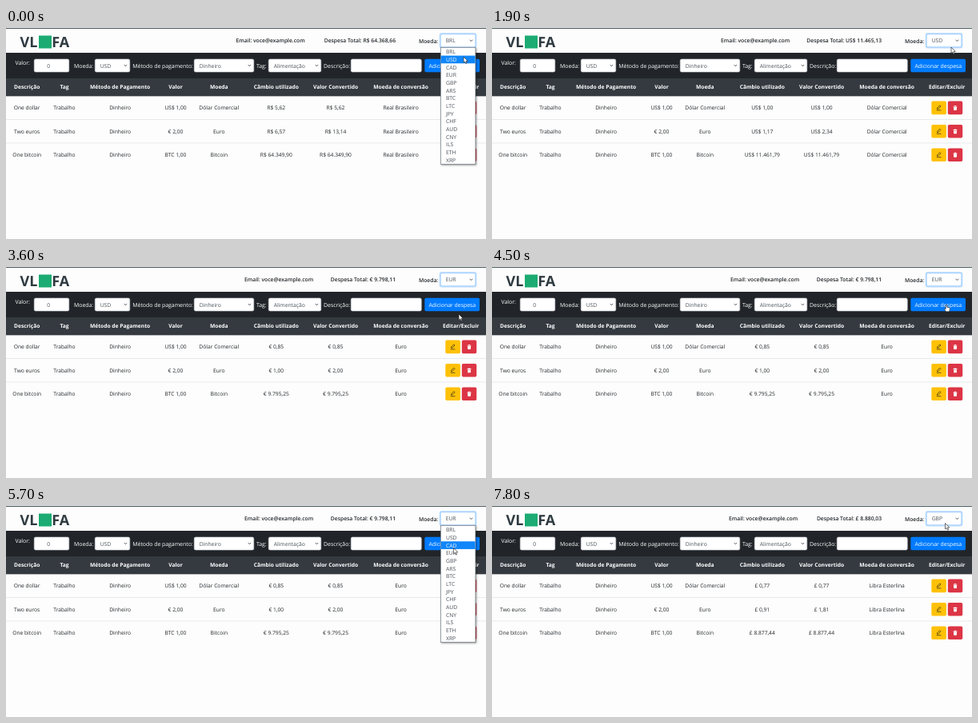
Recreate the animation shown at these times as an HTML page. Size 600 by 264 pixels, loop 8000 ms.

```html
<!DOCTYPE html>
<html lang="pt-BR">
<head>
<meta charset="utf-8">
<title>Carteira de despesas</title>
<style>
  html, body { margin: 0; width: 100%; height: 100%; overflow: hidden; background: #fdfdfd; }
  svg { display: block; width: 600px; height: 264px; }
  text { font: 6.7px "Open Sans", "Noto Sans", sans-serif; fill: #212529; text-rendering: geometricPrecision; white-space: pre; }
  .bold { font-weight: 700; }
  .semi { font-weight: 600; font-size: 6.75px; }
  .mid { text-anchor: middle; }
  .end { text-anchor: end; }
  .light { fill: #fff; }
  .label { font-size: 6.9px; fill: #fff; }
  .field { fill: #495057; font-size: 6.75px; }
  .word { font-size: 18px; font-weight: 700; fill: #2e3a40; }
  .list { filter: drop-shadow(1px 1px 1px #0006); }
</style>
</head>
<body>
<svg id="stage" viewBox="0 0 600 264"></svg>
<script>
const LOOP = 8000, STEP = 100;
const NS = "http://www.w3.org/2000/svg";
const stage = document.getElementById("stage");

function add(tag, attrs, parent = stage) {
  const el = document.createElementNS(NS, tag);
  for (const key in attrs) el.setAttribute(key, attrs[key]);
  return parent.appendChild(el);
}
const box = (x, y, width, height, fill, more, parent) =>
  add("rect", { x, y, width, height, fill, ...more }, parent);
function text(x, y, str, cls = "", parent) {
  const el = add("text", { x, y, class: cls }, parent);
  el.textContent = str;
  return el;
}
const path = (d, attrs, parent) => add("path", { d, fill: "none", ...attrs }, parent);

function input(x, y, w, stroke = "#ced4da") {
  box(x + .25, y + .25, w - .5, 16, "#fff", { rx: 1.8, stroke, "stroke-width": .6 });
}
function select(x, y, w, value, stroke) {
  input(x, y, w, stroke);
  path(`M${x + w - 7.3} ${y + 7.2}l1.7 1.9l1.7 -1.9`, { stroke: "#343a40", "stroke-width": .8 });
  return text(x + 6.7, y + 10.8, value, "field");
}

const codes = "BRL USD CAD EUR GBP ARS BTC LTC JPY CHF AUD CNY ILS ETH XRP".split(" ");
const wallets = {
  BRL: { sign: "R$", name: "Real Brasileiro", total: "64.368,66", emailX: 287.5,
         rates: ["5,62", "6,57", "64.349,90"], values: ["5,62", "13,14", "64.349,90"] },
  USD: { sign: "US$", name: "Dólar Comercial", total: "11.465,13", emailX: 286,
         rates: ["1,00", "1,17", "11.461,79"], values: ["1,00", "2,34", "11.461,79"] },
  EUR: { sign: "€", name: "Euro", total: "9.798,11", emailX: 298,
         rates: ["0,85", "1,00", "9.795,25"], values: ["0,85", "2,00", "9.795,25"] },
  GBP: { sign: "£", name: "Libra Esterlina", total: "8.880,03", emailX: 296,
         rates: ["0,77", "0,91", "8.877,44"], values: ["0,77", "1,81", "8.877,44"] }
};

// Header
box(0, 0, 600, 264, "#fdfdfd");
box(0, 0, 600, 1, "#4f6064");
text(17.5, 24, "VL", "word");
box(41, 9.5, 16, 16, "#1cab72");
text(57.3, 24, "FA", "word");
const email = text(0, 18.2, "Email: voce@example.com", "semi");
const total = text(487, 18.2, "", "semi end");
text(516, 18.5, "Moeda:", "semi");
box(541.6, 6.1, 46.8, 19.3, "#bfdeff", { rx: 3 });
const current = select(543, 7.5, 44, "", "#80bdff");

// Form
const FIELD = 38.75, BASE = 49.6;
box(0, 31, 600, 32, "#212529");
text(11.5, 46.2, "Valor:", "label");
input(35, FIELD, 44);
text(53.2, BASE, "0", "field mid");
text(85, BASE, "Moeda:", "label");
select(111, FIELD, 44, "USD");
text(158.3, BASE, "Método de pagamento:", "label");
select(235, FIELD, 75, "Dinheiro");
text(313, BASE, "Tag:", "label");
select(328, FIELD, 66, "Alimentação");
text(397, BASE, "Descrição:", "label");
input(431, FIELD, 88.5);
box(523.3, FIELD, 68.7, 16.5, "#007bff", { rx: 1.8 });
text(557.8, BASE, "Adicionar despesa", "label mid");

// Table
const cols = [26.2, 73, 142.6, 212, 266.3, 337.8, 412, 493.6, 568.7];
const heads = ["Descrição", "Tag", "Método de Pagamento", "Valor", "Moeda", "Câmbio utilizado",
  "Valor Convertido", "Moeda de conversão", "Editar/Excluir"];
const rows = [
  ["One dollar", "US$ 1,00", "Dólar Comercial"],
  ["Two euros", "€ 2,00", "Euro"],
  ["One bitcoin", "BTC 1,00", "Bitcoin"]
];
box(0, 63, 600, 22.35, "#343a40");
heads.forEach((head, i) => text(cols[i], 76.4, head, "bold light mid"));

const cells = rows.map(([what, value, coin], i) => {
  const y = 99.9 + i * 29.4;
  const base = y + 2.4;
  if (i) box(0, y - 15.1, 600, .7, "#dee2e6");
  [what, "Trabalho", "Dinheiro", value, coin].forEach((str, c) => text(cols[c], base, str, "mid"));
  box(549.3, y - 8.3, 18.6, 16.6, "#ffc107", { rx: 1.8 });
  path(`M556.4 ${y + 1.5}l.4 -1.6l3 -3l1.2 1.2l-3 3zM555.8 ${y + 3}h5.6`,
    { stroke: "#3b3416", "stroke-width": .75 });
  box(569.8, y - 8.3, 18.4, 16.6, "#dc3545", { rx: 1.8 });
  path(`M576.6 ${y - 2.2}h4.8v.9h-4.8zM578.1 ${y - 2.9}h1.8v.8h-1.8zM576.9 ${y - .9}h4.2l-.3 3.9h-3.6z`,
    { fill: "#fff" });
  return [5, 6, 7].map(c => text(cols[c], base, "", "mid"));
});

// Option list
const ROW = 9.68, LIST_TOP = 24.9;
const list = add("g", { class: "list" });
box(543.3, 24.3, 43.6, 146, "#fff", { stroke: "#6c757d", "stroke-width": .7 }, list);
const mark = box(543.7, 0, 42.8, ROW, "#1086fa", {}, list);
const options = codes.map((code, i) => text(550, LIST_TOP + i * ROW + 7.3, code, "field", list));

// Pointers, each with its hot spot at 0,0
const ink = { fill: "#fff", stroke: "#222", "stroke-width": .65, "stroke-linejoin": "round" };
const pointers = {
  arrow: path("M0 0V7.4L1.7 5.9L2.9 8.6L4.1 8.1L3 5.4H5.3Z", ink),
  hand: path("M-.8 .6Q0 -.6 .8 .6V3.2L3.9 4Q4.6 4.3 4.4 5.3L3.7 8.8H-.6L-2.7 5.6Q-2.4 4.5 -.8 5.6Z", ink),
  beam: path("M-1.6 -3.2H1.6M0 -3.2V3.2M-1.6 3.2H1.6", { stroke: "#d5d8da", "stroke-width": .7 })
};

// Pointer route: time, x, y
const route = [
  [0, 572, 36], [300, 572, 36], [400, 572, 38], [600, 572, 38], [800, 575, 56], [1100, 574, 30],
  [1800, 574, 30], [1900, 574, 24], [2300, 575, 16], [2500, 575, 17], [2800, 573, 40.5],
  [3400, 566, 59], [3600, 566, 59], [4100, 566, 96], [4200, 566, 96], [4500, 568, 47],
  [5000, 570, 16], [5300, 570, 16], [5700, 559.5, 52.5], [6000, 560, 70], [6600, 560, 70],
  [7200, 558, 98], [7300, 558, 98], [7800, 566.5, 21.5], [8000, 566.5, 21.5]
];
const opens = [[0, 600], [2500, 3600], [5400, 6600]];
const picks = [[6600, "GBP"], [3600, "EUR"], [600, "USD"], [0, "BRL"]];

function pointerAt(t) {
  const i = route.findIndex(p => p[0] > t);
  const [t0, x0, y0] = route[i - 1], [t1, x1, y1] = route[i];
  const k = (t - t0) / (t1 - t0), s = k * k * (3 - 2 * k);
  return [x0 + (x1 - x0) * s, y0 + (y1 - y0) * s];
}
const within = (v, a, b) => v >= a && v < b;

function pointerKind(x, y, open) {
  if (open) return "arrow";
  if (within(y, 39, 55.5) && within(x, 523, 592)) return "hand";
  if (within(y, 91.5, 108.5) && within(x, 549, 588)) return "hand";
  return within(y, 66, 80) ? "beam" : "arrow";
}

function showWallet(code) {
  const { sign, name, total: sum, emailX, rates, values } = wallets[code];
  current.textContent = code;
  email.setAttribute("x", emailX);
  total.textContent = `Despesa Total: ${sign} ${sum}`;
  cells.forEach(([rate, value, coin], i) => {
    rate.textContent = `${sign} ${rates[i]}`;
    value.textContent = `${sign} ${values[i]}`;
    coin.textContent = name;
  });
}

let shown = "", last = -1;
function draw(t) {
  const code = picks.find(p => t >= p[0])[1];
  if (code !== shown) showWallet(shown = code);

  const [x, y] = pointerAt(t);
  const open = opens.some(([a, b]) => within(t, a, b));
  list.style.display = open ? "" : "none";
  if (open) {
    const over = Math.floor((y - LIST_TOP) / ROW);
    const hot = over < 0 ? codes.indexOf(code) : over;
    mark.setAttribute("y", LIST_TOP + hot * ROW);
    options.forEach((el, i) => { el.style.fill = i === hot ? "#fff" : ""; });
  }

  const kind = pointerKind(x, y, open);
  for (const key in pointers) {
    pointers[key].style.display = key === kind ? "" : "none";
    pointers[key].setAttribute("transform", `translate(${x} ${y})`);
  }
}

const start = performance.now();
function tick() {
  const t = Math.floor((performance.now() - start) % LOOP / STEP) * STEP;
  if (t !== last) draw(last = t);
  requestAnimationFrame(tick);
}
tick();
</script>
</body>
</html>
```
